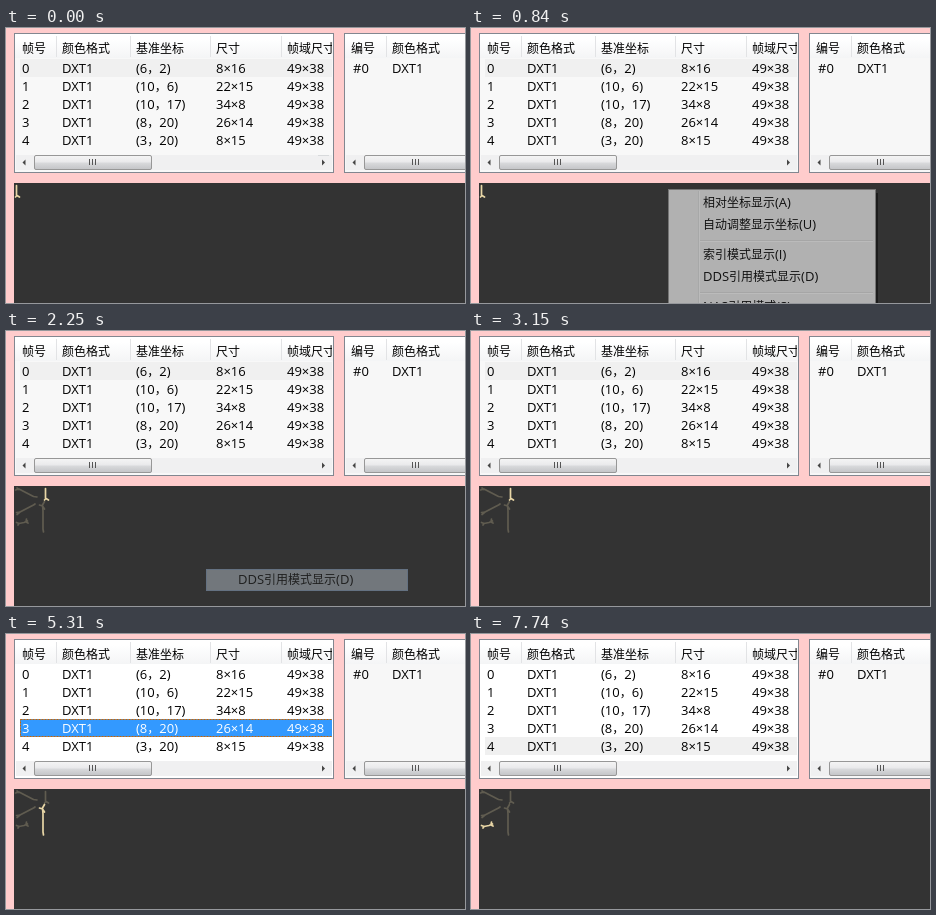
Animation, 459 px wide and 275 px high, one loop 7800 ms. Source, as an HTML page:

```html
<!DOCTYPE html>
<html lang="zh-CN">
<head>
<meta charset="utf-8">
<title>帧列表</title>
<style>
  html, body { margin: 0; width: 100%; height: 100%; overflow: hidden; background: #fcc; }
  svg { display: block; }
  text { font: 12px "Noto Sans CJK SC", "Noto Sans CJK", sans-serif; white-space: pre; }
  .latin { font: 13px "Open Sans", "Noto Sans", sans-serif; }
  .bone { fill: none; stroke: #e8d6a6; stroke-linecap: round; stroke-linejoin: round; }
</style>
</head>
<body>
<svg id="stage" width="459" height="275" viewBox="0 0 459 275">
  <defs>
    <linearGradient id="thumb" x2="0" y2="1">
      <stop offset="0" stop-color="#f5f5f5"/><stop offset=".48" stop-color="#e9e9eb"/>
      <stop offset=".52" stop-color="#d9dadc"/><stop offset="1" stop-color="#c3c4c7"/>
    </linearGradient>
    <linearGradient id="glow" x2="0" y2="1">
      <stop offset="0" stop-color="#e3f4fc"/><stop offset=".5" stop-color="#d6eefb"/>
      <stop offset="1" stop-color="#a4d5ef"/>
    </linearGradient>
    <linearGradient id="hot" x2="0" y2="1">
      <stop offset="0" stop-color="#eff3f8"/><stop offset="1" stop-color="#dfe9f5"/>
    </linearGradient>
    <linearGradient id="head" x2="0" y2="1">
      <stop offset=".2" stop-color="#fff"/><stop offset="1" stop-color="#f4f5f6"/>
    </linearGradient>
    <clipPath id="leftClip"><rect x="9" y="6" width="317" height="138"/></clipPath>
  </defs>
</svg>
<script>
const LOOP = 7800;
const stage = document.getElementById('stage');

function add(parent, tag, attrs = {}) {
  const el = document.createElementNS('http://www.w3.org/2000/svg', tag);
  for (const k in attrs) el.setAttribute(k, attrs[k]);
  parent.appendChild(el);
  return el;
}
const group = (parent, attrs) => add(parent, 'g', attrs);
const path = (parent, d, attrs) => add(parent, 'path', { d, ...attrs });
const rect = (parent, x, y, width, height, fill, more) =>
  add(parent, 'rect', { x, y, width, height, fill, ...more });

// Latin runs are set slightly larger than the Chinese glyphs.
function label(parent, x, y, str) {
  const el = add(parent, 'text', { x, y });
  for (const run of str.match(/[\x20-\x7e×]+|[^\x20-\x7e×]+/g)) {
    const span = add(el, 'tspan', /[\x20-\x7e×]/.test(run) ? { class: 'latin' } : {});
    span.textContent = run;
  }
  return el;
}

function arrow(parent, x, dir) {
  path(parent, `M${x - 1.5 * dir} 131.5l${3 * dir} 3l${-3 * dir} 3z`, { fill: '#444' });
}
function thumb(parent, x, w, fill, stroke) {
  return rect(parent, x + .5, 127.5, w - 1, 14, `url(#${fill})`, { stroke, rx: 1.5 });
}
function grip(parent, x) {
  [-3, 0, 3].forEach(dx => rect(parent, x + dx, 131, 1, 6, '#555'));
}
function panel(x, w) {
  const body = rect(stage, x + .5, 5.5, w - 1, 139, '#f7f7f7', { stroke: '#828790' });
  rect(stage, x + 1, 6, w - 2, 24, 'url(#head)');
  return body;
}
function header(parent, cols, seps) {
  cols.forEach(([x, str]) => label(parent, x, 24.5, str));
  seps.forEach(x => rect(parent, x, 8, 1, 21, '#e2e3e5'));
}

// Left list
const leftBody = panel(8, 320);
const left = group(stage, { 'clip-path': 'url(#leftClip)' });
const xs = [16, 56, 130, 210, 281];
header(left, ['帧号', '颜色格式', '基准坐标', '尺寸', '帧域尺寸'].map((s, i) => [xs[i], s]),
  [50, 124, 204, 275]);
const bar = rect(left, 14, 31, 330, 18, '#f0f0f0');
const focus = rect(left, 14.5, 31.5, 330, 17, 'none', { stroke: '#c60', 'stroke-dasharray': '2 1' });
const rows = [['(6，2)', '8×16'], ['(10，6)', '22×15'], ['(10，17)', '34×8'],
  ['(8，20)', '26×14'], ['(3，20)', '8×15']].map(([base, size], n) => {
  const g = group(left);
  [String(n), 'DXT1', base, size, '49×38'].forEach((s, i) => label(g, xs[i], 45 + 18 * n, s));
  return g;
});
rect(left, 10, 127, 316, 15, '#f0f0f1');
arrow(left, 18, -1);
arrow(left, 317.5, 1);
thumb(left, 28, 118, 'thumb', '#979797');
grip(left, 86);
const buttonEdge = rect(left, 312, 127, 11, 1, '#d8dadc');

// Right list
panel(338, 140);
header(stage, [[345, '编号'], [386, '颜色格式']], [380]);
label(stage, 347, 45, '#0');
label(stage, 386, 45, 'DXT1');
rect(stage, 340, 127, 119, 15, '#f0f0f1');
thumb(stage, 358, 118, 'thumb', '#979797');
const hoverBar = group(stage);
thumb(hoverBar, 341, 16, 'thumb', '#a8b4bc');
thumb(hoverBar, 358, 118, 'glow', '#7ba9c4');
arrow(stage, 348, -1);
grip(stage, 409);

// Viewer
rect(stage, 8, 155, 451, 120, '#333');
const bones = [
  'M39.5 157.5V168M38.5 169L40 167.5L42.5 169',
  'M10.5 181.5L14 181L27.5 174L29 173M11 183.5L14 181',
  'M38.5 170.5L36.5 174L37 180V198L37.5 201M33.5 174L36.5 175L38.5 178',
  'M9.5 159L13 158L27.5 165.5L31 166M11 157L13 158.5',
  'M10.5 191.5L13 192.5L18 191.5L21.5 190M20.5 188L20 191L22 192M12 194L13 192.5'
].map(d => {
  const g = group(stage, { class: 'bone' });
  path(g, d, { 'stroke-width': 1.7 });
  return g;
});

// Context menu
const shadow = path(stage, 'M405 165h2v110h-2z', { fill: '#1c1c1c' });
const menu = group(stage);
rect(menu, 197.5, 161.5, 207, 130, '#f1f1f1', { stroke: '#979797' });
rect(menu, 227, 163, 1, 112, '#e2e3e3');
rect(menu, 228, 163, 1, 112, '#fff');
[212, 264].forEach(y => {
  rect(menu, 229, y, 173, 1, '#e0e0e0');
  rect(menu, 229, y + 1, 173, 1, '#fff');
});
const items = [[164, '相对坐标显示(A)'], [186, '自动调整显示坐标(U)'], [216, '索引模式显示(I)'],
  [238, 'DDS引用模式显示(D)'], [268, 'NAS引用模式(S)']];
const hot = rect(menu, 200.5, 0, 201, 21, 'url(#hot)', { stroke: '#aecff7', rx: 2.5 });
const itemText = (parent, [y, str]) => label(parent, 232, y + 15, str);
items.forEach(item => itemText(menu, item));

// The chosen item lingers after the menu closes.
const chosen = group(stage);
rect(chosen, 200.5, 238.5, 201, 21, '#d0deea', { stroke: '#aecff7' });
itemText(chosen, items[3]);

// Value of the last [time, value] pair reached.
const at = (t, keys) => keys.reduce((v, [k, next]) => t >= k ? next : v, keys[0][1]);
// Progress from 0 to 1 in n equal hard steps, the first one at start.
const steps = (t, start, gap, n) =>
  Math.max(0, Math.min(n, Math.floor((t - start) / gap) + 1)) / n;
const show = (el, opacity) => {
  el.style.display = opacity > 0 ? '' : 'none';
  el.setAttribute('opacity', opacity);
};

function render(t) {
  const row = at(t, [[0, 0], [3420, 1], [4410, 2], [5310, 3], [6150, 4]]);
  const lit = at(t, [[0, 0], [3450, 1], [4500, 2], [5430, 3], [6300, 4]]);
  const active = t >= 3420 && t < 7740;

  leftBody.setAttribute('fill', t < 3420 ? '#f8f8f8' : '#fff');
  bar.setAttribute('y', 31 + 18 * row);
  bar.setAttribute('fill', active ? '#39f' : '#f0f0f0');
  focus.setAttribute('y', 31.5 + 18 * row);
  show(focus, active ? 1 : 0);
  rows.forEach((g, i) => g.setAttribute('fill', active && i === row ? '#fff' : '#000'));

  const all = t >= 2100;
  bones.forEach((g, i) => show(g, i === lit ? 1 : all ? .25 : 0));
  bones[0].setAttribute('transform', all ? '' : 'translate(-29 0)');

  show(shadow, t >= 750 && !all ? 1 : 0);
  show(menu, all ? 0 : steps(t, 750, 30, 6));
  const over = at(t, [[0, -1], [1080, 0], [1140, 1], [1290, -1], [1680, 2], [1710, 3]]);
  show(hot, over < 0 ? 0 : 1);
  if (over >= 0) hot.setAttribute('y', items[over][0] + .5);
  show(chosen, all ? 1 - steps(t, 2100, 30, 10) : 0);

  show(buttonEdge, t < 210 ? 1 : 0);
  show(hoverBar, .8 * (steps(t, 2640, 30, 3) - steps(t, 2850, 75, 5)));
}

const start = performance.now();
function tick() {
  render((performance.now() - start) % LOOP);
  requestAnimationFrame(tick);
}
tick();
</script>
</body>
</html>
```
